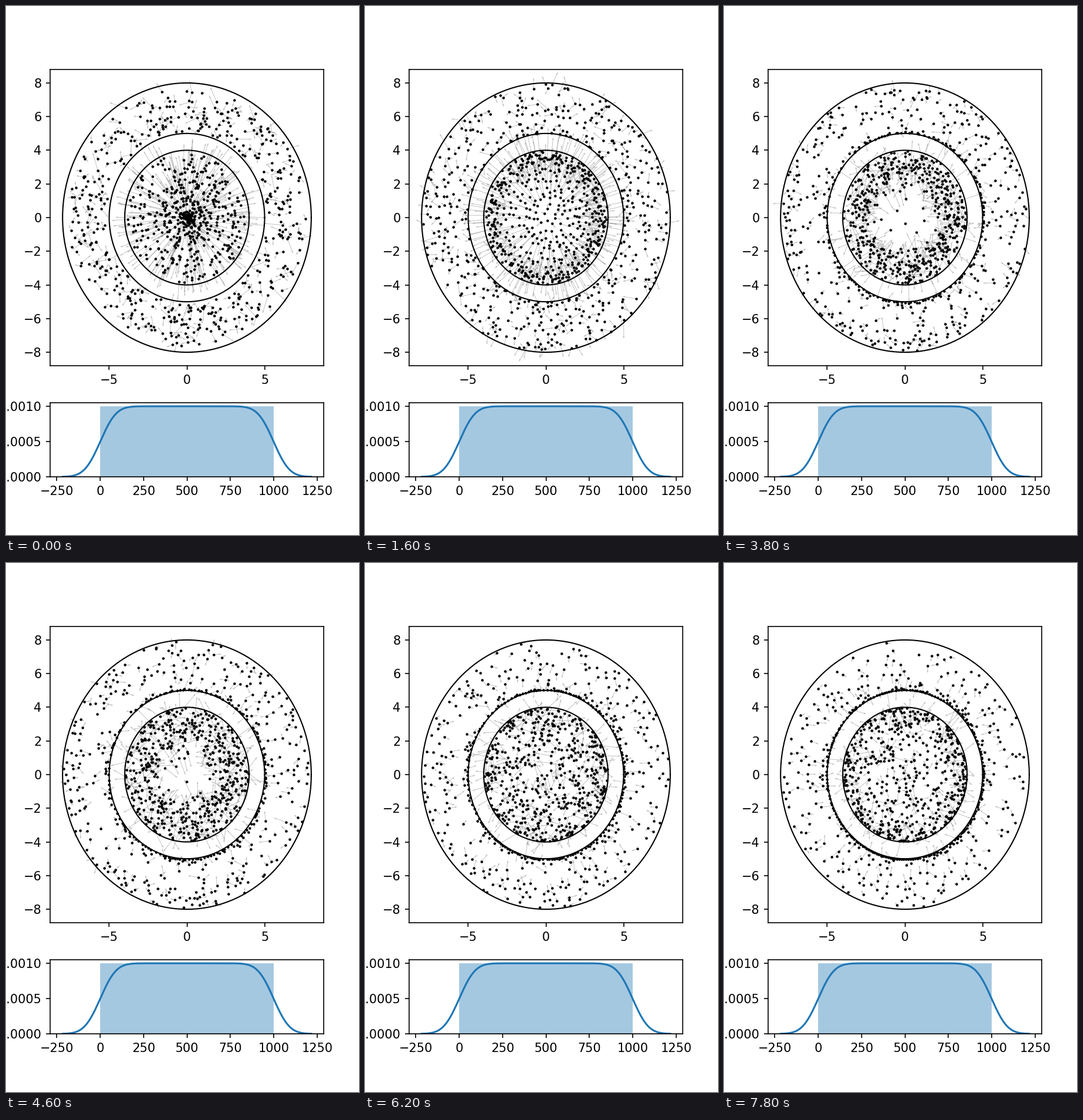
Recreate the animation shown at these times as a matplotlib script. Size 600 by 900 pixels, loop 8000 ms.

```python
import math

import numpy as np
import matplotlib.pyplot as plt
from matplotlib.animation import FuncAnimation

FRAMES, INTERVAL = 40, 200
DT, SUB = 0.15, 2
R_CORE, R_GAP, R_RIM = 4, 5, 8
N_CORE, N_RING = 530, 480

rng = np.random.default_rng(12)


def push(z, charge, soft, near, reach):
    """Long-range repulsion plus a short-range one that keeps dots apart."""
    d = z[:, None] - z[None, :]
    r2 = d.real ** 2 + d.imag ** 2
    r = np.sqrt(r2) + 1e-6
    w = charge / (r2 + soft ** 2)
    w += near * np.clip(1 - r / reach, 0, None) / r
    return (d * w).sum(axis=1)


def bounce(z, v, lo, hi, keep, rough):
    """Rough walls at radii lo and hi that absorb part of the speed."""
    r = np.abs(z)
    u = z / (r + 1e-9)
    vr = (v * u.conj()).real
    hit = ((r > hi) & (vr > 0)) | ((r < lo) & (vr < 0))
    turned = (v - 2 * vr * u) * keep * np.exp(1j * rng.normal(0, rough, z.size))
    return u * np.clip(r, lo, hi), np.where(hit, turned, v)


def ring_field(z, t):
    r = np.abs(z)
    outward = 0.75 * math.exp(-t / 1.2) * (r - R_GAP) / 3
    inward = 1.1 * np.exp(-(r - R_GAP) / 0.5) + 0.12
    return z / r * (outward - inward)


def spin(n):
    return np.exp(2j * np.pi * rng.random(n))


def noise(n, s):
    return rng.normal(0, s, n) + 1j * rng.normal(0, s, n)


def simulate():
    u = spin(N_CORE)
    r = rng.uniform(0.03, 3.85, N_CORE)
    core = u * r
    v_core = u * np.minimum(r / 0.6, 1) * rng.uniform(0.75, 1.3, N_CORE)
    v_core += noise(N_CORE, 0.07)
    ring = spin(N_RING) * rng.uniform(5.15, 7.65, N_RING)
    v_ring = noise(N_RING, 0.38)
    states = []
    h = DT / SUB
    for k in range(FRAMES):
        states.append((np.concatenate([core, ring]),
                       np.concatenate([v_core, v_ring])))
        for s in range(SUB):
            t = k * DT + s * h
            v_core = v_core + h * (push(core, 0.0056, 0.2, 0.5, 0.28) - 0.06 * v_core)
            force = push(ring, 0, 1, 0.9, 0.4) + ring_field(ring, t)
            v_ring = v_ring + h * (force - 0.12 * v_ring)
            core, v_core = bounce(core + h * v_core, v_core, 0, 3.95, 0.82, 0.45)
            ring, v_ring = bounce(ring + h * v_ring, v_ring, 5.04, 7.95, 0.7, 0.3)
    return states


states = simulate()

fig, (ax, low) = plt.subplots(2, 1, figsize=(4, 6), dpi=150,
                              gridspec_kw=dict(height_ratios=[4, 1], hspace=0.2))

# particle chamber
ax.set_xlim(-8.8, 8.8)
ax.set_ylim(-8.8, 8.8)
ax.set_xticks([-5, 0, 5])
ax.set_yticks(range(-8, 9, 2))
a = np.linspace(0, 2 * np.pi, 300)
for radius in (R_CORE, R_GAP, R_RIM):
    ax.plot(radius * np.cos(a), radius * np.sin(a), color="black", lw=1, zorder=3)

z0, v0 = states[0]
dots, = ax.plot(z0.real, z0.imag, "o", color="black", ms=2.15, mew=0, zorder=4)
arrows = ax.quiver(z0.real, z0.imag, v0.real, v0.imag, scale_units="x", scale=1,
                   width=0.002, color="gray", alpha=0.5, zorder=2)

# density of a uniform sample
BW = 72.5
x = np.linspace(-3 * BW, 999 + 3 * BW, 300)
cdf = np.vectorize(lambda s: 0.5 * (1 + math.erf(s / math.sqrt(2))))
low.bar(0, 0.001, width=1000, align="edge", color="C0", alpha=0.4)
low.plot(x, 0.001 * (cdf(x / BW) - cdf((x - 999) / BW)), color="C0", lw=1.5)
low.set_xlim(-289, 1288)
low.set_ylim(0, 0.00105)
low.set_xticks(range(-250, 1251, 250))
low.set_yticks([0, 0.0005, 0.001], ["0.0000", "0.0005", "0.0010"])


def update(k):
    z, v = states[k]
    dots.set_data(z.real, z.imag)
    arrows.set_offsets(np.column_stack([z.real, z.imag]))
    arrows.set_UVC(v.real, v.imag)
    return dots, arrows


anim = FuncAnimation(fig, update, frames=FRAMES, interval=INTERVAL,
                     repeat=True, repeat_delay=0)
plt.show()
```
